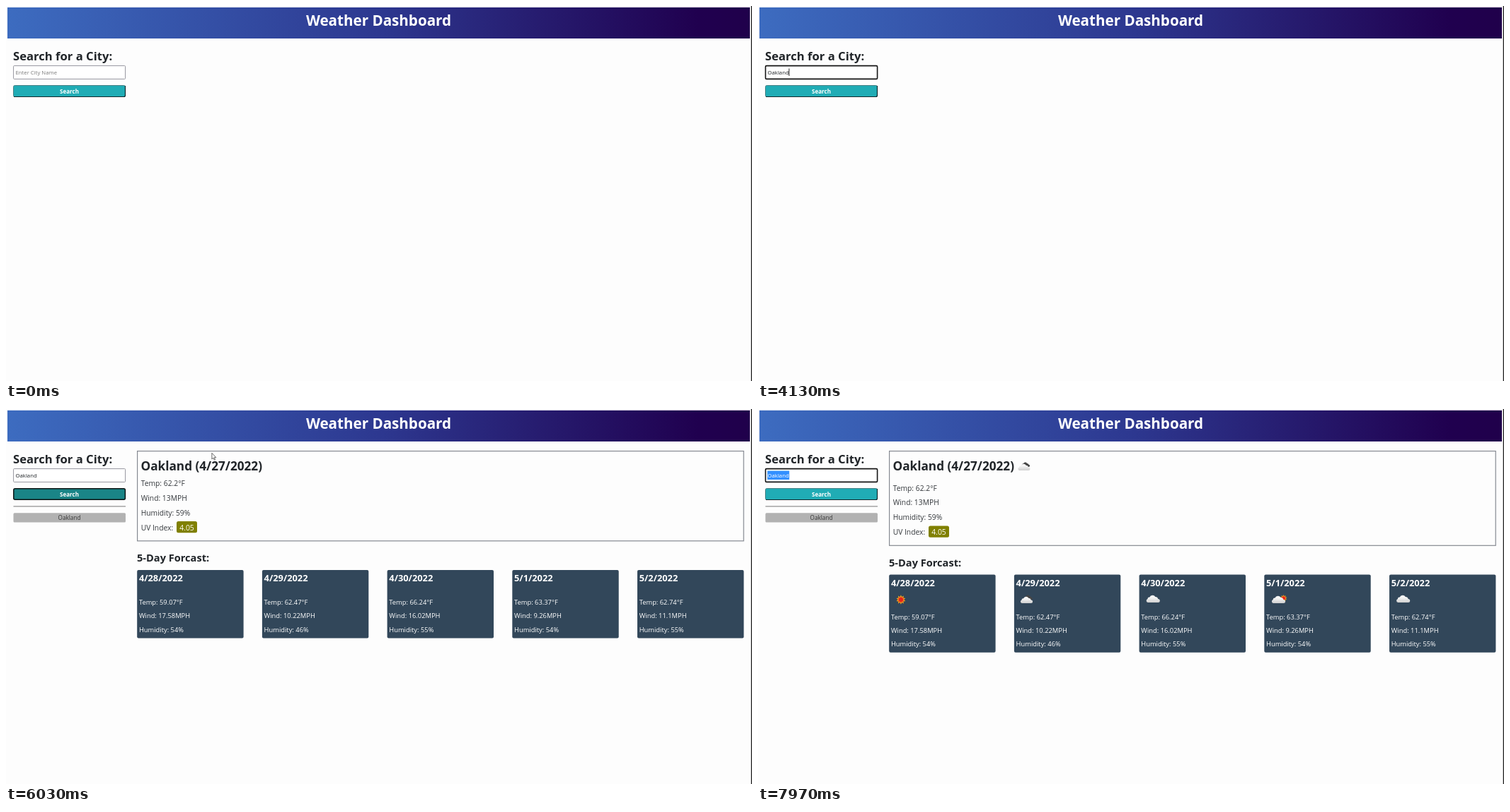
These frames come from a looping animation (1054 by 531 pixels, 8 s). An HTML page:

```html
<!DOCTYPE html>
<html lang="en">
<head>
<meta charset="utf-8">
<title>Weather Dashboard</title>
<style>
  html, body { margin: 0; height: 100%; overflow: hidden; background: #fdfdfd; }
  svg { display: block; font-family: "Open Sans", "Noto Sans", sans-serif; }
</style>
</head>
<body>
<svg width="1054" height="531" viewBox="0 0 1054 531">
  <defs>
    <linearGradient id="bar">
      <stop offset="0" stop-color="#3d6cc0"/>
      <stop offset=".5" stop-color="#2d3890"/>
      <stop offset=".93" stop-color="#20004f"/>
      <stop offset="1" stop-color="#20004b"/>
    </linearGradient>
    <linearGradient id="puff" x2="0" y2="1">
      <stop offset=".3" stop-color="#f6f6f6"/>
      <stop offset="1" stop-color="#cfcfcf"/>
    </linearGradient>
    <path id="cloud" d="M3 11A2.6 2.6 0 0 1 2.6 6A2.6 2.6 0 0 1 5.5 3.6A4.6 4.6 0 0 1 13.6 3A4 4 0 0 1 17.5 6A2.5 2.5 0 0 1 17.5 11Z"/>
    <g id="sun">
      <path id="rays" fill="#f5a31c"/>
      <circle r="3.7" fill="#e8231a" stroke="#f47a1c" stroke-width=".8"/>
    </g>
  </defs>
  <rect x="2" y="2" width="1049" height="44" fill="url(#bar)"/>
  <rect x="1052.7" width="1.3" height="531" fill="#222"/>
  <g id="page"></g>
</svg>
<script>
const LOOP = 8000;
const INK = '#212529';
const CITY = 'Oakland';
const KEYS = [3270, 3470, 3600, 3770, 3890, 4010, 4130];
const FOCUS = 2030, HOVER_BUTTON = 4970, PRESS = 5170, LISTED = 5430,
      RESULT = 6030, ICONS = 6100, HOVER_INPUT = 7170, REFOCUS = 7770, SELECT = 7970;
const POINTER = [[5470, 235, 92], [5530, 289, 56], [6030, 290.5, 62], [6970]];
const DAYS = [
  ['4/28/2022', '59.07', '17.58', 54, 'sun'],
  ['4/29/2022', '62.47', '10.22', 46, 'broken'],
  ['4/30/2022', '66.24', '16.02', 55, 'cloud'],
  ['5/1/2022', '63.37', '9.26', 54, 'partly'],
  ['5/2/2022', '62.74', '11.1', 55, 'cloud']
];

const page = document.getElementById('page');
const pen = document.createElement('canvas').getContext('2d');

document.getElementById('rays').setAttribute('d', 'M' + Array.from({ length: 20 }, (_, i) => {
  const r = i % 2 ? 4.2 : 6.8, a = i * Math.PI / 10;
  return [r * Math.sin(a), -r * Math.cos(a)].map(v => v.toFixed(2));
}).join('L') + 'Z');

const text = (x, y, size, str, fill = INK, extra = '') =>
  `<text x="${x}" y="${y}" font-size="${size}" fill="${fill}" ${extra}>${str}</text>`;
const bold = (x, y, size, str, fill, extra = '') =>
  text(x, y, size, str, fill, 'font-weight="700" ' + extra);
const box = (x, y, w, h, fill, extra = '') =>
  `<rect x="${x}" y="${y}" width="${w}" height="${h}" fill="${fill}" ${extra}/>`;
const MIDDLE = 'text-anchor="middle"';

function textWidth(str, size) {
  pen.font = size + 'px "Open Sans", "Noto Sans", sans-serif';
  return pen.measureText(str).width;
}

const cloud = (x, y, fill = 'url(#puff)', scale = 1) =>
  `<use href="#cloud" transform="translate(${x} ${y}) scale(${scale})" fill="${fill}"/>`;
const sun = (x, y, scale = 1) =>
  `<use href="#sun" transform="translate(${x} ${y}) scale(${scale})"/>`;

// Icons are placed by their upper left corner.
const icon = {
  sun: (x, y) => sun(x + 14, y + 7),
  cloud: (x, y) => cloud(x + 6.5, y),
  broken: (x, y) => cloud(x + 10.5, y, '#454545', .63) + cloud(x + 5.5, y + 2, undefined, .9),
  partly: (x, y) => sun(x + 24.5, y + 5, .75) + cloud(x + 7, y + 1)
};

function inputField(t) {
  const focused = t >= FOCUS && t < PRESS || t >= REFOCUS;
  const hovered = t >= 1770 && t < FOCUS || t >= HOVER_INPUT;
  const selected = t >= SELECT;
  const typed = CITY.slice(0, KEYS.filter(k => k <= t).length);
  const width = textWidth(typed, 7.75);
  const frame = focused ? 'stroke="#151515" stroke-width="1.6" rx="1.5"'
    : `stroke="${hovered ? '#666' : '#96969e'}" rx="1"`;
  let out = box(10.6, 84.6, 158, 18.8, '#fff', frame);
  if (selected) out += box(13.3, 87.5, width + .7, 12.5, '#3390ff');
  out += text(13.5, 96.9, 7.75, typed || 'Enter City Name', selected ? '#fff' : typed ? INK : '#7a7a7a');
  const restart = Math.max(...[FOCUS, ...KEYS, REFOCUS].filter(k => k <= t));
  if (focused && !selected && (t - restart) % 1070 < 535)
    out += box(13.3 + width, 88.5, .9, 10.5, '#111');
  return out;
}

function searchButton(t) {
  const active = t >= HOVER_BUTTON && t < REFOCUS;
  const pressed = t >= PRESS && t < REFOCUS;
  const fill = active ? '#1a8587' : '#20acb5';
  const frame = pressed
    ? box(10.8, 112.8, 157.6, 15.4, fill, 'rx="2" stroke="#0c1414" stroke-width="1.5"')
    : box(10.5, 112.5, 158, 16, fill, 'rx="2" stroke="#4a7f84"') +
      '<path d="M11 128.5H166.5Q168.5 128.5 168.5 126.5V113" fill="none" stroke="#10282c" stroke-width="1.2"/>';
  return frame + bold(89.5, 123.8, 8, 'Search', '#fff', MIDDLE);
}

function forecast(t) {
  const loaded = t >= ICONS;
  const dy = loaded ? 6.5 : 0;
  const rows = (x, y, step, size, fill, temp, wind, humidity) =>
    [`Temp: ${temp}°F`, `Wind: ${wind}MPH`, `Humidity: ${humidity}%`]
      .map((line, i) => text(x, y + i * step, size, line, fill)).join('');

  let out = box(185.6, 59.6, 856.6, 127.2 + dy, 'none', 'stroke="#858991" stroke-width="1.2"') +
    bold(190.5, loaded ? 87 : 86.5, 17.2, `${CITY} (4/27/2022)`) +
    rows(190.7, 109 + dy, 20.9, 10.3, '#33373b', '62.2', 13, 59) +
    text(190.7, 171.6 + dy, 10.3, 'UV Index:', '#33373b') +
    box(241, 159 + dy, 29, 16.3, '#808000', 'rx="2.5"') +
    text(255.5, 171.6 + dy, 10.4, '4.05', '#fff', MIDDLE) +
    bold(185, 216 + dy, 14.6, '5-Day Forcast:');
  if (loaded) out += icon.broken(361, 75);

  DAYS.forEach(([date, temp, wind, humidity, sky], i) => {
    const x = 185.2 + i * 176.7;
    out += box(x, 228 + dy, 150.4, loaded ? 110.3 : 96.5, '#32475a', 'rx="2"') +
      bold(x + 2.7, 244 + dy, 12.85, date, '#fff') +
      rows(x + 2.7, loaded ? 297.6 : 277.2, 19.2, 9.35, '#fff', temp, wind, humidity);
    if (loaded) out += icon[sky](x + 2.7, 263);
  });
  return out;
}

function pointer(t) {
  const [, x, y] = POINTER.filter(p => p[0] <= t).pop() || [];
  return x === undefined ? '' : `<path transform="translate(${x} ${y})" fill="#fff" stroke="#444"
    stroke-width=".8" d="M.4 .3v8.7l2-1.8 1.4 3 1.3-.6-1.4-2.9h2.6z"/>`;
}

function render(t) {
  let out = bold(526.5, 28, 20.6, 'Weather Dashboard', '#fff', MIDDLE) +
    bold(10, 76.7, 16.65, 'Search for a City:') + inputField(t) + searchButton(t);
  if (t >= LISTED) out += box(10.5, 137.4, 158.5, 1, '#777') +
    box(10.5, 147.3, 158.5, 13.2, '#b2b2b2', 'rx="1.5"') +
    text(89.5, 157.2, 8.2, CITY, '#333', MIDDLE);
  if (t >= RESULT) out += forecast(t);
  return out + pointer(t);
}

let shown = '';
function tick() {
  const markup = render(performance.now() % LOOP);
  if (markup !== shown) page.innerHTML = shown = markup;
  requestAnimationFrame(tick);
}
tick();
</script>
</body>
</html>
```
